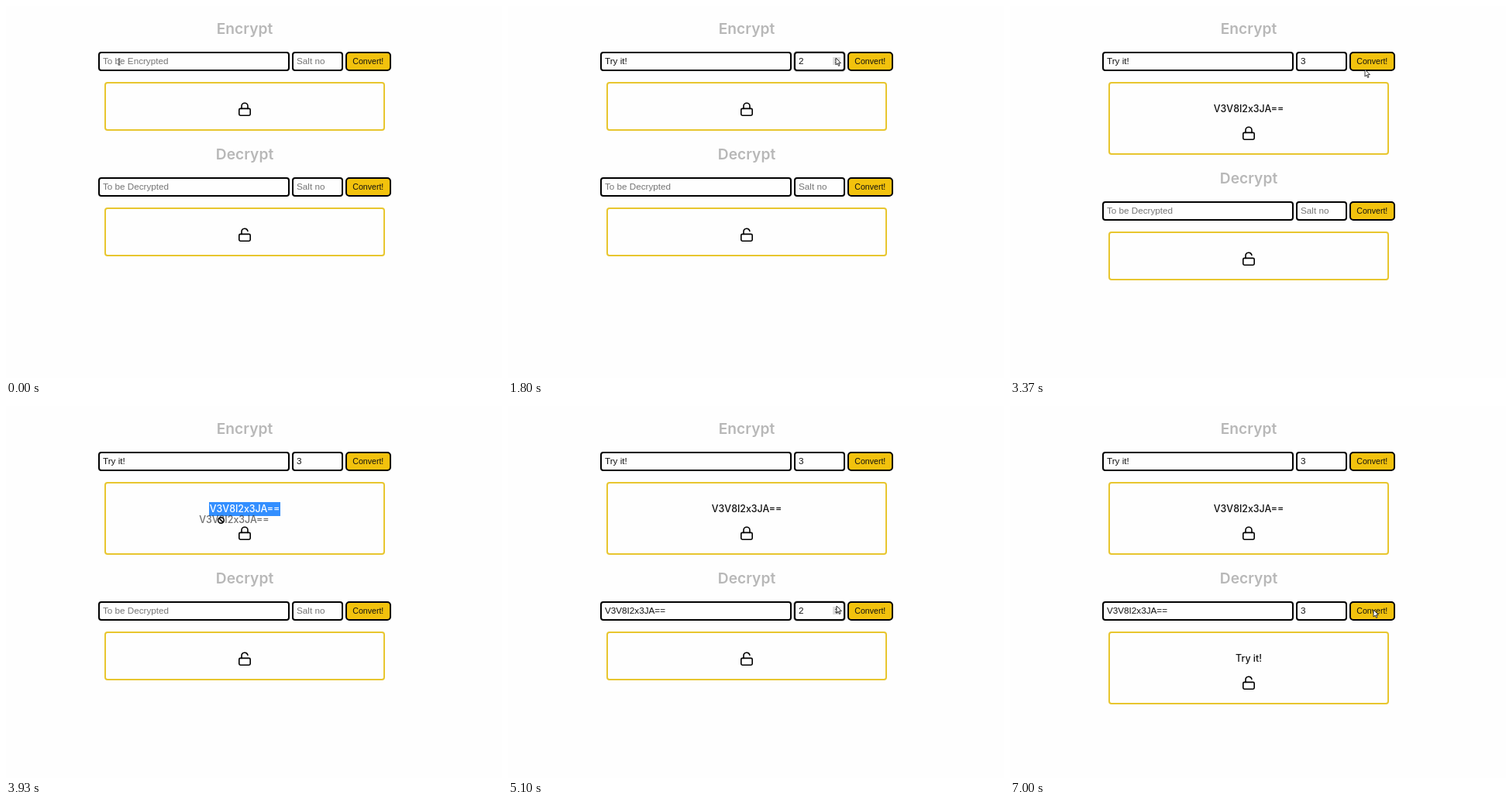
These frames come from a looping animation (640x480 px, 7030 ms). An HTML page:

```html
<!DOCTYPE html>
<html lang="en">
<head>
<meta charset="utf-8">
<title>Encrypt and decrypt</title>
<style>
  html, body { margin: 0; width: 100%; height: 100%; overflow: hidden; background: #fefefe; }
  svg { display: block; width: 640px; height: 480px; }
  text { font: 11.7px "Liberation Sans", Arial, sans-serif; fill: #111; white-space: pre; }
  .title { font: 600 19.2px Inter, sans-serif; fill: #b8b8b8; text-anchor: middle; }
  .result { font: 500 12.4px Inter, sans-serif; text-anchor: middle; }
  .hint { fill: #757575; }
  .button { font-size: 10.6px; text-anchor: middle; }
  .field { fill: #fefefe; stroke: #000; stroke-width: 2; }
  .focus { fill: none; stroke: #000; stroke-opacity: .22; }
  .box { fill: none; stroke: #e8c62f; stroke-width: 2; }
  .icon { fill: none; stroke: #000; stroke-width: 2; stroke-linecap: round; stroke-linejoin: round; }
</style>
</head>
<body>
<svg id="stage" viewBox="0 0 640 480"></svg>
<script>
const LOOP = 7030;
const PLAIN = "Try it!", CIPHER = "V3V8I2x3JA==";
const ENCRYPTED = 2830, DECRYPTED = 5830;
const SELECT = 3780, DRAG = 3830, DROP = 4316;
const GROW = 31;

// Pointer stops: time, x, y
const stops = [
  [0, 146, 72], [770, 146, 72], [1230, 423, 67], [2020, 423, 67],
  [2680, 474, 70], [2950, 474, 70], [3370, 458, 82], [3740, 291, 133],
  [DRAG, 291, 133], [DROP, 169.5, 262.5], [4420, 169.5, 262.5],
  [4890, 424, 258], [5180, 424, 258], [5650, 469, 263], [LOOP, 469, 263]
];

const stage = document.getElementById("stage");
const rect = (cls, x, y, w, h, r = 3) =>
  `<rect class="${cls}" x="${x}" y="${y}" width="${w}" height="${h}" rx="${r}"/>`;
const text = (cls, x, y, s) => `<text class="${cls}" x="${x}" y="${y}">${s}</text>`;

function pointerAt(t) {
  const i = Math.max(1, stops.findIndex(s => s[0] > t));
  const [t0, x0, y0] = stops[i - 1], [t1, x1, y1] = stops[i];
  const u = (t - t0) / (t1 - t0), e = u * u * (3 - 2 * u);
  return { x: x0 + (x1 - x0) * e, y: y0 + (y1 - y0) * e };
}

// Salt value after clicks at the given times
const count = (t, times) => times.filter(at => t >= at).length || "";

function field(x, w, value, hint, focused) {
  return (focused ? rect("focus", x - 1.5, 58.5, w + 3, 26, 4.5) : "") +
    rect("field", x, 60, w, 23) +
    text(value ? "" : "hint", x + 5, 75, value || hint);
}

function spinner() {
  return `<rect x="419" y="66" width="10" height="10" fill="#dedede"/>
    <path d="M421.5 70l2.5-2.5 2.5 2.5zM421.5 72.5l2.5 2.5 2.5-2.5z" fill="#555"/>`;
}

function panel(p) {
  const grow = p.result ? GROW : 0;
  const shackle = p.open ? "M7 11V7a5 5 0 0 1 9.9-1" : "M7 11V7a5 5 0 0 1 10 0v4";
  return `<g transform="translate(0 ${p.top})">
    ${text("title", 308, 36, p.title)}
    ${field(120, 245, p.value, "To be " + p.title + "ed", p.focus === "text")}
    ${field(370, 64, p.salt, "Salt no", p.focus === "salt")}
    ${p.spin ? spinner() : ""}
    <rect x="439" y="60" width="57" height="23" rx="4" fill="#f2c20d" stroke="#000" stroke-width="2"/>
    ${text("button", 467.3, 75, "Convert!")}
    ${rect("box", 128, 99, 360, 61 + grow)}
    ${p.selected ? '<rect x="262" y="124" width="92" height="18" fill="#338fff"/>' : ""}
    <g ${p.selected ? 'style="--ink:#fff"' : ""}>
      <text class="result" x="308" y="137" style="fill:var(--ink,#111)">${p.result}</text>
    </g>
    <g class="icon" transform="translate(298.4 ${123.6 + grow}) scale(.8)">
      <rect x="3" y="11" width="18" height="11" rx="2"/><path d="${shackle}"/>
    </g>
  </g>`;
}

const cursors = {
  arrow: `<path d="M0 0v9l2.1-1.9 1.5 3.3 1.4-.6-1.5-3.2h2.9z" fill="#fff" stroke="#222" stroke-width=".9"/>`,
  beam: `<path d="M-1.5-4h3M0-4v8M-1.5 4h3" stroke="#333" fill="none"/>`,
  denied: `<circle r="3.8" fill="#fff" fill-opacity=".7" stroke="#000" stroke-width="1.5"/>
    <path d="M-2.7-2.7l5.4 5.4" stroke="#000" stroke-width="1.5"/>`
};

function draw(t) {
  const { x, y } = pointerAt(t);
  const lower = 162 + (t >= ENCRYPTED ? GROW : 0);
  const dragging = t >= DRAG && t < DROP;
  const inside = (top, x0, x1) => x > x0 && x < x1 && y > top + 59 && y < top + 84;
  const overSpin = inside(0, 418, 430) || inside(lower, 418, 430);
  const overText = [0, lower].some(top => inside(top, 119, 366) || inside(top, 369, 435)) ||
    (t >= ENCRYPTED && t < DRAG && x > 262 && x < 354 && y > 124 && y < 142);

  const typed = PLAIN.slice(0, Math.max(0, Math.floor((t - 60) / 80)));
  const caret = t >= 60 && t < 770 ? "<tspan>|</tspan>" : "";

  const upper = panel({
    title: "Encrypt", top: 0, value: typed + caret,
    salt: count(t, [1630, 1800, 2000]),
    focus: t >= 60 && t < 1630 ? "text" : t >= 1630 && t < 2750 ? "salt" : "",
    spin: inside(0, 369, 435),
    result: t >= ENCRYPTED ? CIPHER : "",
    selected: t >= SELECT && t < DROP
  });
  const bottom = panel({
    title: "Decrypt", top: lower, open: true,
    value: t >= DROP ? CIPHER : "",
    salt: count(t, [4970, 5070, 5170]),
    focus: t >= DROP && t < 4970 ? "text" : t >= 4970 && t < 5750 ? "salt" : "",
    spin: inside(lower, 369, 435),
    result: t >= DECRYPTED ? PLAIN : ""
  });
  const ghost = dragging
    ? `<g opacity=".6">${text("result", 308 + x - 291, 137 + y - 133, CIPHER)}</g>` : "";
  const kind = dragging && !overText ? "denied"
    : overText && !overSpin && !dragging ? "beam" : "arrow";

  stage.innerHTML = upper + bottom + ghost +
    `<g transform="translate(${x} ${y})">${cursors[kind]}</g>`;
}

const start = performance.now();
function tick() {
  draw((performance.now() - start) % LOOP);
  requestAnimationFrame(tick);
}
tick();
</script>
</body>
</html>
```
